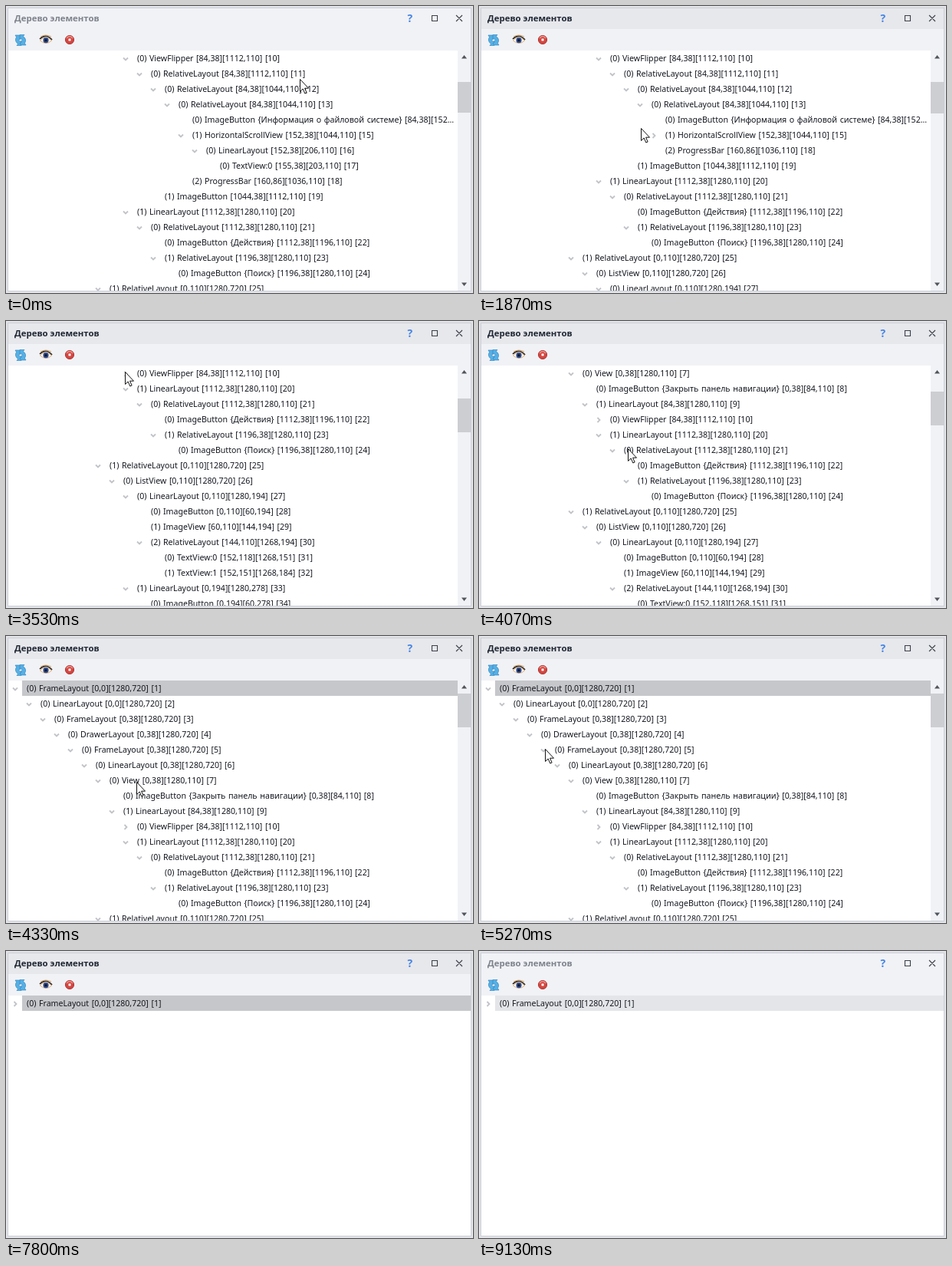
An HTML page for the animation above (9.27 s loop, 609 by 374 pixels).

```html
<!DOCTYPE html>
<html lang="ru">
<head>
<meta charset="utf-8">
<title>Дерево элементов</title>
<style>
  html, body { margin: 0; width: 100%; height: 100%; overflow: hidden; background: #e4e5ea; }
  #stage { position: relative; width: 609px; height: 374px; overflow: hidden;
    font: 10.6px/20px "Noto Sans", sans-serif; color: #14171f; word-spacing: .8px;
    --header: #f1f2f6; --title: #7d828b; --selected: #e4e5e9; }
  #stage.active { --header: #e7e8ec; --title: #1f2733; --selected: #c6c7ca; }
  #stage > * { position: absolute; }
  #window { left: 2px; top: 2px; width: 603px; height: 368px; border: 1px solid #cbced5; background: #fff; }
  #header { left: 3px; top: 3px; width: 603px; height: 27px; background: var(--header); }
  #toolbar { left: 3px; top: 30px; width: 603px; height: 28px; background: #f1f2f6; }
  #title { left: 11px; top: 6px; font-size: 11.4px; font-weight: bold; word-spacing: 0; color: var(--title); }
  #icons, #cursor { left: 0; top: 0; overflow: visible; }
  #rows { left: 3px; top: 58px; width: 603px; height: 313px; overflow: hidden; }
  .row { position: relative; height: 20px; }
  .row span { position: absolute; right: 0; height: 20px; padding: 0 3px 0 6px; box-sizing: border-box;
    white-space: nowrap; overflow: hidden; text-overflow: ellipsis; }
  .row.selected span { background: var(--selected); }
  .row svg { position: absolute; top: 7px; width: 8px; height: 8px; fill: none; stroke: #c1c3c8; stroke-width: 1.8; }
  .row svg.closed { transform: rotate(-90deg); }
  #scrollbar { left: 589px; top: 58px; width: 17px; height: 313px; background: #f1f2f6; }
  #scrollbar svg { position: absolute; fill: #50545c; }
  #thumb { position: absolute; width: 17px; background: #cdced2; }
</style>
</head>
<body>
<div id="stage">
  <div id="window"></div>
  <div id="header"></div>
  <div id="toolbar"></div>
  <div id="title">Дерево элементов</div>
  <svg id="icons" width="609" height="58">
    <text x="523.5" y="21" font-size="14" font-weight="bold" fill="#4584e4">?</text>
    <path d="M555.5 12.5h7v7h-7z M587 12l8 8m0-8l-8 8" fill="none" stroke="#3c4049" stroke-width="1.1"/>
    <g id="refresh">
      <path id="arrow" d="M12 38h6l2 2-2.500 2.500q-1 2 .5 4l2-1v6h-6l1.500-2q-5-4-2-9z"
        fill="#55b0e4" stroke="#2a7fbd" stroke-width=".6"/>
      <use href="#arrow" transform="rotate(180 19 44.500)"/>
    </g>
    <g id="eye">
      <path d="M44.5 45q7-8 15 0q-7 7-15 0z" fill="#fff" stroke="#d9ad73"/>
      <circle cx="52" cy="44.7" r="3.6" fill="#314d91"/>
      <circle cx="52" cy="44.7" r="1.7" fill="#0d1425"/>
      <path d="M44 43q8-8 16 1" fill="none" stroke="#2b2420" stroke-width="1.7"/>
      <path d="M45 40q7-4 14 0" fill="none" stroke="#d6a15f"/>
    </g>
    <g id="stop">
      <circle cx="83" cy="44" r="5.6" fill="#d3453f" stroke="#b03a39"/>
      <path d="M79 42q4-5 8 0" fill="none" stroke="#ee968f" stroke-width="1.3"/>
      <rect x="81.500" y="42.500" width="3" height="3" fill="#fff"/>
    </g>
  </svg>
  <div id="rows"></div>
  <div id="scrollbar">
    <svg width="17" height="17"><path d="M5 10.500l3.500-4.500 3.500 4.500z"/></svg>
    <svg width="17" height="17" style="bottom:0"><path d="M5 6.500l3.500 4.500 3.500-4.500z"/></svg>
    <div id="thumb"></div>
  </div>
  <svg id="cursor" width="13" height="21">
    <path d="M.5.5v16l3.700-3.500 2.600 6 2.300-1-2.500-5.800h4.900z" fill="#fff" stroke="#111" stroke-linejoin="round"/>
  </svg>
</div>
<script>
const LOOP = 9270, STEP = 200 / 3;
const ROW = 20, INDENT = 18, WIDTH = 603, HEIGHT = 313, BAR = 17;

// One leading space per level; numbers are added while parsing.
const lines = `FrameLayout [0,0][1280,720]
 LinearLayout [0,0][1280,720]
  FrameLayout [0,38][1280,720]
   DrawerLayout [0,38][1280,720]
    FrameLayout [0,38][1280,720]
     LinearLayout [0,38][1280,720]
      View [0,38][1280,110]
       ImageButton {Закрыть панель навигации} [0,38][84,110]
       LinearLayout [84,38][1280,110]
        ViewFlipper [84,38][1112,110]
         RelativeLayout [84,38][1112,110]
          RelativeLayout [84,38][1044,110]
           RelativeLayout [84,38][1044,110]
            ImageButton {Информация о файловой системе} [84,38][152,110]
            HorizontalScrollView [152,38][1044,110]
             LinearLayout [152,38][206,110]
              TextView:0 [155,38][203,110]
            ProgressBar [160,86][1036,110]
          ImageButton [1044,38][1112,110]
        LinearLayout [1112,38][1280,110]
         RelativeLayout [1112,38][1280,110]
          ImageButton {Действия} [1112,38][1196,110]
          RelativeLayout [1196,38][1280,110]
           ImageButton {Поиск} [1196,38][1280,110]
      RelativeLayout [0,110][1280,720]
       ListView [0,110][1280,720]`.split("\n");

const add = (depth, text) => lines.push(" ".repeat(depth) + text);

for (let i = 0; i < 8; i++) {
  const top = 110 + 84 * i, clip = y => Math.min(y, 720), bottom = clip(top + 84);
  add(8, `LinearLayout [0,${top}][1280,${bottom}]`);
  add(9, `ImageButton [0,${top}][60,${bottom}]`);
  add(9, `ImageView [60,${top}][144,${bottom}]`);
  add(9, `RelativeLayout [144,${top}][1268,${bottom}]`);
  add(10, `TextView:0 [152,${top + 8}][1268,${clip(top + 41)}]`);
  add(10, `TextView:1 [152,${clip(top + 41)}][1268,${clip(top + 74)}]`);
}
add(4, "ListView [-640,38][0,720]");
for (let i = 0; i < 11; i++) {
  const top = 38 + 62 * i, bottom = top + 62;
  add(5, `LinearLayout [-640,${top}][0,${bottom}]`);
  add(6, `ImageView [-640,${top}][-578,${bottom}]`);
  add(6, `TextView:0 [-578,${top}][0,${bottom}]`);
}

const siblings = [];
const nodes = lines.map((line, i) => {
  const depth = line.search(/\S/);
  siblings.length = depth + 1;
  const index = siblings[depth] = (siblings[depth] ?? -1) + 1;
  return { id: i + 1, depth, text: `(${index}) ${line.trim()} [${i + 1}]` };
});
nodes.forEach((node, i) => node.parent = nodes[i + 1]?.depth > node.depth);

// [time, value]
const collapses = [[1530, 15], [2530, 13], [3530, 10], [5470, 5], [6470, 3], [7470, 1]];
const scrolls = [[0, 9], [4070, 6], [4200, 3], [4330, 0]];
const ACTIVE_FROM = 1400, ACTIVE_TO = 9130, CURSOR_GONE = 7800;

// [time, x, y]
const path = [
  [0, 383, 95], [330, 244, 151], [400, 244, 151], [870, 230, 161], [1000, 230, 161],
  [1130, 230, 165], [1670, 230, 165], [1870, 211, 159], [2400, 212, 125], [2730, 212, 125],
  [2800, 194, 111], [3330, 155, 66], [3670, 155, 66], [4070, 194, 166], [4600, 146, 215],
  [5270, 86, 147], [5670, 86, 147], [6130, 46, 101], [6270, 46, 101], [6330, 45, 101],
  [6670, 45, 101], [7130, 15, 68], [7270, 15, 68], [7330, 14, 68], [7670, 14, 68], [7730, 6, 68]
];

const el = id => document.getElementById(id);

function cursorAt(t) {
  const next = path.findIndex(p => p[0] > t);
  if (next < 0) return path.at(-1).slice(1);
  const a = path[next - 1], b = path[next], k = (t - a[0]) / (b[0] - a[0]);
  return [1, 2].map(i => Math.round(a[i] + (b[i] - a[i]) * k));
}

function visibleNodes(closed) {
  let hiddenBelow = Infinity;
  return nodes.filter(node => {
    if (node.depth > hiddenBelow) return false;
    hiddenBelow = closed.has(node.id) ? node.depth : Infinity;
    return true;
  });
}

function rowHtml(node, closed, width) {
  const x = node.depth * INDENT;
  const chevron = node.parent
    ? `<svg class="${closed.has(node.id) ? "closed" : ""}" style="left:${x + 5}px"><path d="M1 2.500l3 3 3-3"/></svg>` : "";
  return `<div class="row ${node.id === 1 ? "selected" : ""}" style="width:${width}px">${chevron}` +
    `<span style="left:${x + 18}px">${node.text}</span></div>`;
}

function drawTree(closed, first) {
  const shown = visibleNodes(closed), scrollable = shown.length * ROW > HEIGHT;
  const width = scrollable ? WIDTH - BAR : WIDTH;
  el("rows").innerHTML = shown.slice(first, first + 16).map(n => rowHtml(n, closed, width)).join("");
  el("scrollbar").style.display = scrollable ? "" : "none";
  const scale = (HEIGHT - 2 * BAR) / shown.length;
  el("thumb").style.top = Math.ceil(BAR + first * scale) + "px";
  el("thumb").style.height = Math.round(HEIGHT / ROW * scale) + "px";
}

let lastTree;
function draw(now) {
  const tick = Math.floor((now % LOOP + 4) / STEP);
  const t = Math.round(tick * STEP / 10) * 10;
  const closed = new Set(collapses.filter(c => c[0] <= t).map(c => c[1]));
  const first = scrolls.findLast(s => s[0] <= t)[1];
  const tree = closed.size + ":" + first;
  if (tree !== lastTree) drawTree(closed, first);
  lastTree = tree;

  el("stage").className = t >= ACTIVE_FROM && t < ACTIVE_TO ? "active" : "";
  const [x, y] = cursorAt(t);
  el("cursor").style.transform = `translate(${x}px, ${y}px)`;
  el("cursor").style.display = t < CURSOR_GONE ? "" : "none";
}

const start = performance.now();
function loop() {
  draw(performance.now() - start);
  requestAnimationFrame(loop);
}
loop();
</script>
</body>
</html>
```
